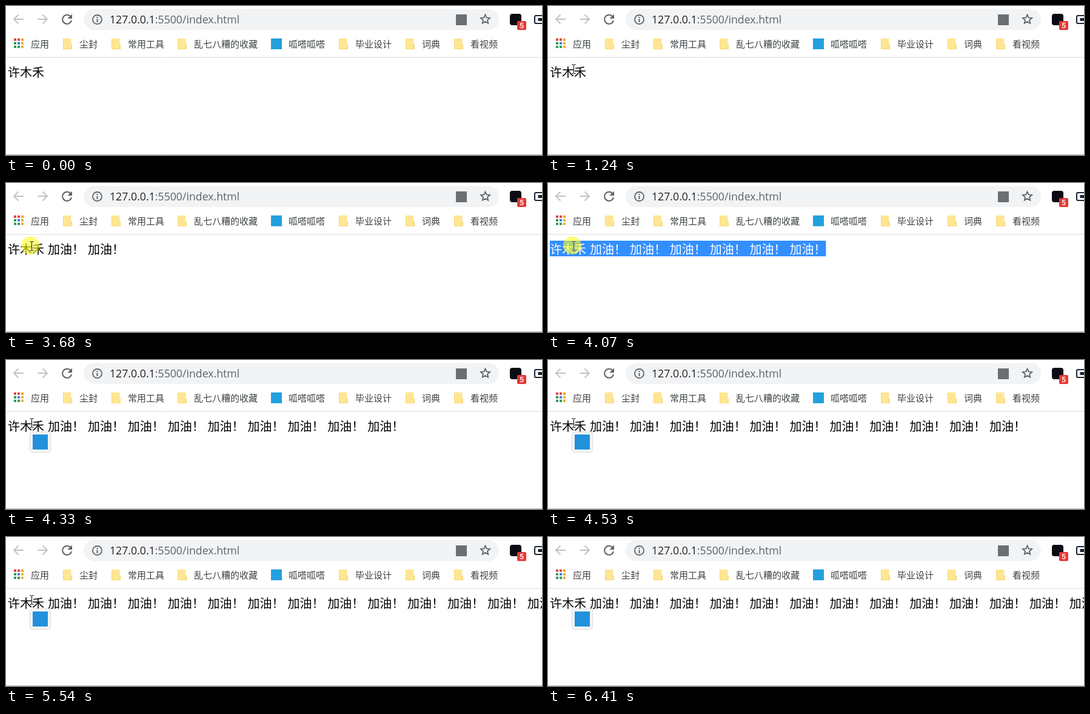
An HTML page for the animation above (7.94 s loop, 884 px wide and 248 px high).

```html
<!DOCTYPE html>
<html lang="zh-CN">
<head>
<meta charset="utf-8">
<title>index.html</title>
<style>
  html, body { margin: 0; width: 100%; height: 100%; overflow: hidden; background: #fff; }
  svg { display: block; width: 884px; height: 248px; }
  text { font-family: "Noto Sans CJK SC", "Noto Sans CJK", sans-serif; font-weight: 350; white-space: pre; }
  .url { font: 17.7px "Open Sans", "Noto Sans", sans-serif; fill: #5f6368; }
  .badge { font: 500 13px Roboto, "Open Sans", sans-serif; fill: #fff; }
  .marks text { font-size: 15px; fill: #3c4043; }
  .line text { font-size: 20px; fill: #000; }
  .line.on text { fill: #fff; }
  .icon { fill: none; stroke: #5f6368; stroke-width: 2; }
  #beam { fill: none; stroke: #fff; mix-blend-mode: difference; }
</style>
</head>
<body>
<svg viewBox="0 0 884 248">
  <defs>
    <g id="folder">
      <path d="M13 10h3v8h-3z" fill="#f8d673"/>
      <rect x="1" width="13.500" height="18" rx="1" fill="#ffe694"/>
      <path d="M1.500 1v16.500H14" fill="none" stroke="#f8d673"/>
    </g>
  </defs>
  <rect width="884" height="248" fill="#fff"/>

  <!-- toolbar -->
  <g class="icon">
    <path d="M29 22H13M20.500 14.500L13 22l7.500 7.500M52.500 22h15.500M60.500 14.500L68 22l-7.500 7.500" stroke="#bfc1c4" stroke-width="1.800"/>
    <path d="M106.500 17.500A7.500 7.500 0 1 0 108 24"/>
  </g>
  <path d="M109 13.500v7.500h-7.500z" fill="#5f6368"/>
  <rect x="128" y="5" width="685" height="35" rx="17.500" fill="#f1f3f4"/>
  <circle class="icon" cx="150.500" cy="22.500" r="7.500" style="stroke-width:1.800"/>
  <path d="M149.500 18h2v2h-2zM149.500 21.500h2v5.500h-2z" fill="#5f6368"/>
  <text class="url" x="171" y="29"><tspan fill="#202124">127.0.0.1</tspan>:5500/index.html</text>
  <rect x="742" y="14" width="18" height="18" fill="#6b6f73"/>
  <path class="icon" transform="translate(790.500 14.500) scale(.9)" d="M0 0l2.400 5.500 6 .5-4.500 4 1.300 5.800L0 12.700l-5.200 3.100L-3.900 10l-4.500-4 6-.5z"/>
  <rect x="831" y="13" width="19" height="19" rx="4" fill="#0b0b14"/>
  <rect x="843" y="25" width="15" height="15" rx="2" fill="#e53935"/>
  <text class="badge" x="850.500" y="37" text-anchor="middle">5</text>
  <rect x="872" y="16" width="18" height="13" rx="2" fill="none" stroke="#1a2233" stroke-width="2"/>
  <path d="M877.500 20H884v5h-6.500z" fill="#1a2233"/>

  <g class="marks" id="marks"></g>
  <path d="M0 85.500h884" stroke="#dadce0"/>
  <path d="M0 247.500h884" stroke="#b8b8b8"/>

  <!-- page -->
  <rect id="sel" x="3" y="96" height="26" fill="#338fff"/>
  <g class="line" id="line"></g>
  <g id="popup">
    <rect x="39.500" y="119.500" width="34" height="34" rx="4" fill="#f5f5f5" stroke="#dadce0"/>
    <rect x="44" y="124" width="25" height="25" fill="#2191dc"/>
  </g>
  <circle id="press" cx="40" cy="104" r="15" fill="#ffff1e" fill-opacity=".6"/>
  <path id="beam" d="M-3-7.500h2.500M.5-7.500H3M0-7V7M-3 7.500h2.500M.5 7.500H3"/>
  <path id="arrow" d="M.5.5v16l3.700-3.500 2.600 6 2.400-1-2.600-5.800h5z" fill="#fff" stroke="#000"/>
</svg>
<script>
const LOOP = 7940, WORDS = 13, PITCH = 65.9, FIRST = 69;
const $ = id => document.getElementById(id);

function add(parent, tag, attrs, text = '') {
  const el = document.createElementNS('http://www.w3.org/2000/svg', tag);
  for (const key in attrs) el.setAttribute(key, attrs[key]);
  el.textContent = text;
  return parent.appendChild(el);
}
const show = (el, on) => { el.style.visibility = on ? 'visible' : 'hidden'; };

// bookmarks bar
const marks = $('marks');
['#e0483c', '#e0483c', '#f0a030', '#2f9e58', '#3b82e0', '#f0b030', '#2f9e58', '#2f9e58', '#f0b030']
  .forEach((fill, i) => add(marks, 'rect', {
    x: 13 + i % 3 * 6, y: 54 + Math.floor(i / 3) * 6, width: 4, height: 4, fill
  }));
[[41, '应用'], [121, '尘封'], [201, '常用工具'], [310, '乱七八糟的收藏'],
 [466, '呱嗒呱嗒'], [576, '毕业设计'], [686, '词典'], [766, '看视频']]
  .forEach(([x, name], i) => {
    add(marks, 'text', { x, y: 69 }, name);
    if (i === 4) add(marks, 'rect', { x: 437, y: 54, width: 18, height: 18, fill: '#23a0de' });
    else if (i) add(marks, 'use', { href: '#folder', x: x - 28, y: 54 });
  });

// page text
const line = $('line');
add(line, 'text', { x: 3, y: 117.5 }, '许木禾');
const words = Array.from({ length: WORDS }, (_, i) =>
  add(line, 'text', { x: FIRST + i * PITCH, y: 117.5 }, '加油！'));

// [time, word count, flags]: p = button down, s = line selected, i = popup icon
const steps = [
  [0, 0, ''], [1700, 0, 'p'], [1760, 1, ''], [2420, 1, 'p'], [2490, 2, ''],
  [3680, 2, 'p'], [3750, 3, ''], [3810, 3, 'p'], [3880, 4, 'ps'], [3940, 5, 'i'],
  [4010, 5, 'ps'], [4070, 6, 'ps'], [4140, 7, 'i'], [4200, 7, 'ps'], [4270, 8, 'ps'],
  [4330, 9, 'i'], [4400, 9, 'ps'], [4460, 10, 'ps'], [4530, 11, 'i'],
  [4870, 11, 'ps'], [4930, 12, 'i'], [5200, 12, 'pi'], [5270, 13, 'i'],
  [5470, 13, 'ps'], [5540, 13, 'i']
];

const REST = [42.5, 105];
const mix = (a, b, p) => a + (b - a) * p;

function pointer(t) {
  if (t < 460 || t >= 6410) return null;
  if (t < 1240) {
    const u = (Math.floor((t - 460) / 70.9) + 0.01) / 11;
    const p = 1 - (1 - u) ** 2.5;
    return [mix(613, REST[0], p), mix(201, REST[1], p) - 245 * p * p * (1 - p)];
  }
  if (t < 6210) return REST;
  const p = (Math.floor((t - 6210) / 66.7) + 1) / 3;
  return [mix(REST[0], 735, p), mix(REST[1], 214, p)];
}

function draw(t) {
  const [, count, flags] = steps.findLast(s => s[0] <= t);
  const selected = flags.includes('s');
  words.forEach((w, i) => show(w, i < count));
  line.classList.toggle('on', selected);
  show($('sel'), selected);
  $('sel').setAttribute('width', FIRST + count * PITCH - 9);
  show($('popup'), flags.includes('i'));
  show($('press'), flags.includes('p'));

  const pos = pointer(t);
  const textEnd = 63 + count * PITCH;
  const overText = pos && pos[0] < textEnd && pos[1] > 96 && pos[1] < 122;
  show($('beam'), overText);
  show($('arrow'), pos && !overText);
  if (pos) $(overText ? 'beam' : 'arrow').setAttribute('transform', `translate(${pos})`);
}

const start = performance.now();
function tick() {
  draw((performance.now() - start) % LOOP);
  requestAnimationFrame(tick);
}
tick();
</script>
</body>
</html>
```
